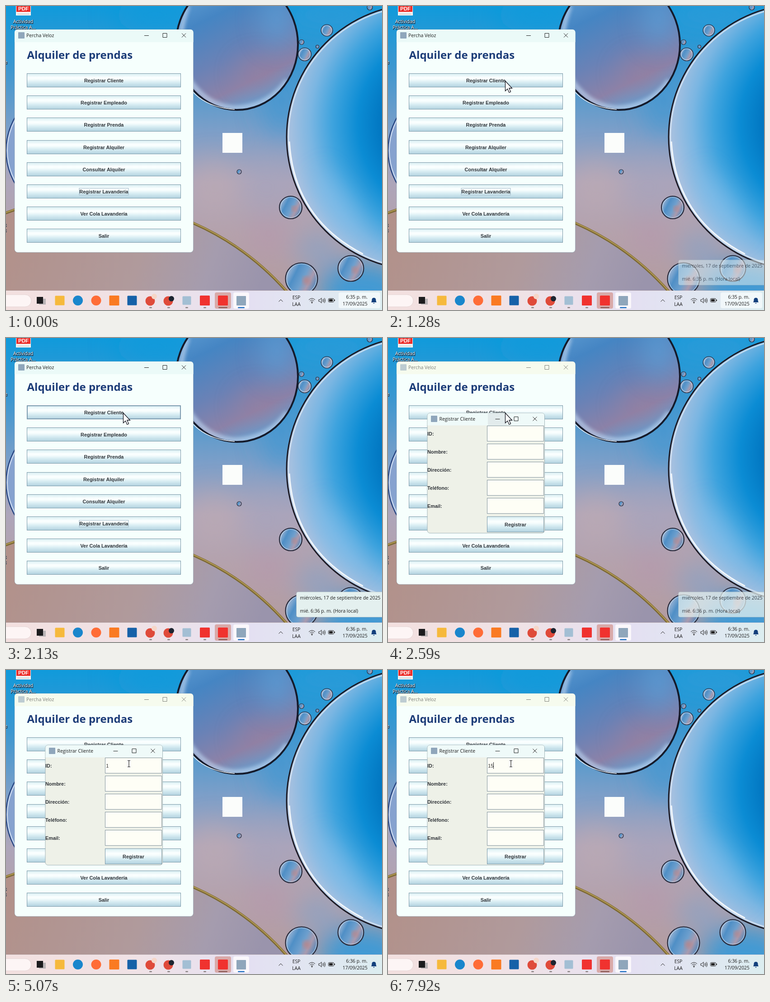
Recreate the animation shown at these times as an HTML page. Size 832 by 673 pixels, loop 8000 ms.

```html
<!DOCTYPE html>
<html lang="es">
<head>
<meta charset="utf-8">
<title>Alquiler de prendas</title>
<style>
html, body { margin: 0; width: 100%; height: 100%; overflow: hidden; }
svg { position: absolute; left: 0; top: 0; width: 832px; height: 673px; }
#wall { will-change: transform; }
text { white-space: pre; }
.ui { font: 10.4px "Open Sans", "Noto Sans", sans-serif; fill: #1a1a1a; }
.bold { font: bold 10.9px "Liberation Sans", Arial, sans-serif; fill: #2f3338; }
.field { font: 10.9px "Liberation Sans", Arial, sans-serif; fill: #333; }
.head { font: bold 24px "Open Sans", "Noto Sans", sans-serif; fill: #1c3c78; }
.mid { text-anchor: middle; }
.end { text-anchor: end; }
.line { fill: none; stroke: #222; stroke-width: 1; }
</style>
</head>
<body>
<svg id="wall" viewBox="0 0 832 673">
  <defs>
    <linearGradient id="sky" x1="0" y1="0" x2="0" y2="1">
      <stop offset="0" stop-color="#109adb"/><stop offset=".2" stop-color="#3c97d0"/>
      <stop offset=".42" stop-color="#7f9fc8"/><stop offset=".58" stop-color="#ada5ba"/>
      <stop offset=".75" stop-color="#b5a2ac"/><stop offset="1" stop-color="#b39a9c"/>
    </linearGradient>
    <linearGradient id="top" x1=".15" y1="0" x2=".6" y2="1">
      <stop offset="0" stop-color="#64a3d8"/><stop offset=".3" stop-color="#4585c3"/>
      <stop offset=".6" stop-color="#6a82b6"/><stop offset=".82" stop-color="#8c82a8"/>
      <stop offset="1" stop-color="#62a0d2"/>
    </linearGradient>
    <radialGradient id="big" cx=".62" cy=".45" r=".64">
      <stop offset="0" stop-color="#0068b2"/><stop offset=".38" stop-color="#0072bd"/>
      <stop offset=".55" stop-color="#0b8cd4"/><stop offset=".7" stop-color="#3ea3de"/>
      <stop offset=".83" stop-color="#7bb6e2"/><stop offset=".95" stop-color="#a5c0e0"/>
      <stop offset="1" stop-color="#b2c2de"/>
    </radialGradient>
    <linearGradient id="drop" x1="0" y1=".2" x2="1" y2=".7">
      <stop offset="0" stop-color="#b9c3da"/><stop offset=".3" stop-color="#4f8fc6"/>
      <stop offset=".55" stop-color="#6d9fcd"/><stop offset=".75" stop-color="#a99aae"/>
      <stop offset="1" stop-color="#4686bd"/>
    </linearGradient>
    <linearGradient id="floor" x1="0" y1="0" x2="1" y2=".15">
      <stop offset="0" stop-color="#b29088"/><stop offset=".55" stop-color="#b09a9c"/>
      <stop offset=".8" stop-color="#a59cae"/><stop offset="1" stop-color="#9a94ac"/>
    </linearGradient>
    <filter id="soft" x="-1" y="-1" width="3" height="3"><feGaussianBlur stdDeviation="28"/></filter>
    <filter id="glow"><feGaussianBlur stdDeviation="4"/></filter>
    <clipPath id="inBig"><circle cx="915" cy="290" r="293"/></clipPath>
    <clipPath id="inTop"><ellipse cx="511" cy="85" rx="135" ry="145"/></clipPath>
  </defs>
  <rect width="832" height="673" fill="url(#sky)"/>
  <g id="tints" filter="url(#soft)"></g>
  <circle cx="146" cy="320" r="146" fill="#86a2cf" stroke="#1f3c78" stroke-width="2"/>
  <circle cx="146" cy="320" r="143" fill="none" stroke="#cfdcf0" stroke-width="2"/>
  <path d="M-5 460Q210 376 415 481Q535 534 622 633V680H-5Z" fill="url(#floor)"/>
  <path d="M-5 460Q210 376 415 481Q535 534 622 633" fill="none" stroke="#7d6a35" stroke-width="6"/>
  <path d="M-5 459Q210 375 415 480Q535 533 622 632" fill="none" stroke="#b39a55" stroke-width="2"/>
  <g clip-path="url(#inTop)">
    <ellipse cx="511" cy="85" rx="136" ry="146" fill="url(#top)"/>
    <ellipse cx="560" cy="150" rx="45" ry="35" fill="#9a7f9e" opacity=".6" filter="url(#soft)"/>
    <ellipse cx="600" cy="30" rx="35" ry="60" fill="#58a8e0" opacity=".6" filter="url(#soft)"/>
    <path d="M402 0Q366 100 410 170Q450 224 508 226Q580 224 622 165" fill="none" stroke="#bcd3ee" stroke-width="10" opacity=".8" filter="url(#glow)"/>
  </g>
  <ellipse cx="511" cy="85" rx="135" ry="145" fill="none" stroke="#141a2a" stroke-width="4"/>
  <path d="M384 135Q408 222 506 229" fill="none" stroke="#e8f0f8" stroke-width="1.5"/>
  <g clip-path="url(#inBig)">
    <circle cx="915" cy="290" r="294" fill="url(#big)"/>
    <ellipse cx="735" cy="440" rx="25" ry="85" fill="#7cc0ee" opacity=".6" transform="rotate(-32 735 440)" filter="url(#soft)"/>
  </g>
  <circle cx="915" cy="290" r="294" fill="none" stroke="#1c1a24" stroke-width="3"/>
  <circle cx="915" cy="290" r="290" fill="none" stroke="#dbe6f2" stroke-width="3" opacity=".75"/>
  <path d="M627 300Q637 470 790 549" fill="none" stroke="#f2f7fb" stroke-width="3"/>
  <g id="drops"></g>
  <rect x="479" y="281" width="44" height="44" fill="#fbfdfb"/>
  <g id="desk"></g>
</svg>
<svg id="ui" viewBox="0 0 832 673">
  <defs>
    <linearGradient id="btn" x1="0" y1="0" x2="0" y2="1">
      <stop offset="0" stop-color="#d8eef2"/><stop offset=".3" stop-color="#fbffff"/>
      <stop offset=".42" stop-color="#f6fdfd"/><stop offset=".65" stop-color="#d8edf3"/>
      <stop offset="1" stop-color="#b2d2df"/>
    </linearGradient>
    <linearGradient id="bar">
      <stop offset="0" stop-color="#f3e0df"/><stop offset=".35" stop-color="#f0e2e6"/>
      <stop offset=".65" stop-color="#e4e0f2"/><stop offset="1" stop-color="#dcedf0"/>
    </linearGradient>
  </defs>
  <g id="main"></g>
  <g id="dialog"></g>
  <g id="tip"></g>
  <g id="task"></g>
  <path id="arrow" d="M.5 0V22L5.500 17.500L9 25.500L12.500 24L9 16H15.500Z" fill="#fff" stroke="#15151f" stroke-width="1.300"/>
  <g id="beam" fill="none">
    <path d="M269 200.500H275M269 214.500H275M272 200V215" stroke="#fff" stroke-width="3"/>
    <path d="M269 200.500H275M269 214.500H275M272 200V215" stroke="#222" stroke-width="1.200"/>
  </g>
</svg>
<script>
const $ = id => document.getElementById(id);
const rect = (x, y, w, h, fill, extra = '') =>
  `<rect x="${x}" y="${y}" width="${w}" height="${h}" fill="${fill}" ${extra}/>`;
const disc = (x, y, r, fill, extra = '') =>
  `<circle cx="${x}" cy="${y}" r="${r}" fill="${fill}" ${extra}/>`;
const text = (x, y, str, cls = 'ui', extra = '') =>
  `<text x="${x}" y="${y}" class="${cls}" ${extra}>${str}</text>`;
const line = (d, extra = '') => `<path class="line" d="${d}" ${extra}/>`;

// Wallpaper
$('tints').innerHTML = [
  [610, 210, 45, 80, '#3f97d2', .7], [330, 20, 90, 40, '#149adb', .8],
  [720, 20, 110, 40, '#2f9bd8', .8], [580, 400, 60, 60, '#a5a3bd', .5],
  [460, 400, 60, 60, '#c0aab2', .6], [580, 510, 45, 45, '#b496ae', .6],
  [690, 540, 50, 45, '#86a3c8', .7], [790, 630, 100, 65, '#3f9ad4', 1]
].map(([x, y, rx, ry, c, o]) =>
  `<ellipse cx="${x}" cy="${y}" rx="${rx}" ry="${ry}" fill="${c}" opacity="${o}"/>`).join('');

$('drops').innerHTML = [
  [710, 54, 13], [661, 107, 14.5], [654, 80, 5.5], [689, 90, 3.5], [805, 3, 6],
  [630, 446, 25], [654, 604, 35.5], [763, 581, 28.5], [516, 367, 5]
].map(([x, y, r]) =>
  disc(x, y, r, 'url(#drop)', `stroke="#2b2c3c" stroke-width="${r > 20 ? 2.2 : 1.2}"`) +
  (r > 10 ? disc(x, y, r - 2.5, 'none', 'stroke="#d9e3ee" stroke-width="1.2" opacity=".7"') : '') +
  (r > 20 ? disc(x + r * .3, y + r * .1, r * .25, '#b98589', 'opacity=".8" filter="url(#glow)"') : '')
).join('');

const label = (x, y, str, cls = 'ui mid') =>
  text(x + .6, y + .8, str, cls, 'style="fill:#10243a;stroke:#10243a;stroke-width:1.4;stroke-opacity:.7"') +
  text(x, y, str, cls, 'style="fill:#fff"');
$('desk').innerHTML =
  rect(22, -4, 33, 25, '#f4f4f4') + rect(23, -4, 31, 17, '#ec2f2b') + rect(25, 17, 27, 1.5, '#c9c9c9') +
  text(38.5, 10, 'PDF', 'bold mid', 'style="fill:#fff;font-size:11.5px"') +
  label(38, 38, 'Actividad') + label(38, 51, 'Práctica A...') +
  label(-3, 128, 'e', 'ui') + label(-4, 488, 's', 'ui') + label(-4, 500, 's', 'ui');

// Windows
const captionButtons = (min, max, close, y) => line(
  `M${min - 5} ${y + .5}h10M${max - 4.5} ${y - 4.5}h9v9h-9zM${close - 4.5} ${y - 4.5}l9 9m0 -9l-9 9`);
const javaIcon = (x, y, s) => rect(x, y, s, s, '#8fa6bb', 'rx="1"');
const button = (x, y, w, h, str) =>
  rect(x + .5, y + .5, w - 1, h - 1, 'url(#btn)', 'stroke="#7c98a8"') +
  text(x + w / 2, y + h / 2 + 4, str, 'bold mid');
const ring = (id, y, w) => rect(216.5 - w / 2, y, w, 15, 'none', `id="${id}" stroke="#9fb8c8"`);

const actions = ['Registrar Cliente', 'Registrar Empleado', 'Registrar Prenda', 'Registrar Alquiler',
  'Consultar Alquiler', 'Registrar Lavandería', 'Ver Cola Lavandería', 'Salir'];
$('main').innerHTML =
  rect(19, 52, 395.5, 493.5, '#f6fffd', 'rx="7" stroke="#7d98a8" stroke-opacity=".5"') +
  '<path id="title" d="M19 80V59Q19 52 26 52H407.500Q414.500 52 414.500 59V80Z"/>' +
  `<g id="caption">${javaIcon(27, 58, 14)}${text(45, 69, 'Percha Veloz')}${captionButtons(311, 351.5, 393.5, 65)}</g>` +
  text(46.5, 117, 'Alquiler de prendas', 'head') +
  actions.map((a, i) => button(46, Math.round(149 + 49.2 * i), 341, 31, a)).join('') +
  rect(47.5, 150.5, 338, 28, 'none', 'id="hover" stroke="#7f9fb8"') +
  ring('ringTop', 157.5, 90) + ring('ringLow', 403.5, 109);

const fields = ['ID:', 'Nombre:', 'Dirección:', 'Teléfono:', 'Email:'];
$('dialog').innerHTML =
  rect(87, 166, 259.5, 266, '#eef1e8', 'rx="6" stroke="#8fa3ab" stroke-opacity=".8"') +
  '<path d="M87.500 193.500V172Q87.500 166.500 93 166.500H340.500Q346 166.500 346 172V193.500Z" fill="#effaf9"/>' +
  rect(221, 166.5, 41.5, 27, '#e2ebec', 'id="minHover"') +
  javaIcon(95, 172, 14) + text(113.5, 183, 'Registrar Cliente') + captionButtons(242.5, 283.5, 325, 179) +
  fields.map((f, i) => {
    const y = 194 + 40 * i;
    return text(87, y + 22, f, 'bold') +
      rect(219.5, y + .5, 125, 34, '#fefef6', 'stroke="#8596a0"');
  }).join('') +
  button(219, 395, 126, 35, 'Registrar') +
  text(221.2, 216, '', 'field', 'id="typed"') + rect(0, 204, 1, 15, '#333', 'id="caret"');

// Clock tooltip and taskbar
$('tip').innerHTML =
  rect(642.5, 562, 200, 56, '#e4f0ef', 'rx="4" stroke="#9fb0b8" stroke-opacity=".6"') +
  text(650.5, 579, 'miércoles, 17 de septiembre de 2025') + text(650.5, 608, '', 'ui', 'id="tipTime"');

const square = (x, s, c) => rect(x - s / 2, 652 - s / 2, s, s, c, 'rx="1.5"');
const dash = (x, w, c) => rect(x - w / 2, 666.5, w, 2.5, c, 'rx="1.2"');
$('task').innerHTML =
  rect(0, 630, 832, 43, 'url(#bar)') + rect(0, 630, 832, 1, '#e6dcdf') +
  rect(-30, 639, 86, 27, '#fdf5f5', 'rx="13.5" stroke="#e4d3d3"') +
  rect(462, 634, 36, 36, '#d9aaa9', 'rx="4"') + rect(503, 634, 35, 36, '#faf7fb', 'rx="4"') +
  rect(73, 648, 15, 13, '#b9b4b6') + rect(68, 644, 14, 15, '#1c1c1e') +
  square(119, 21, '#f6b93c') + disc(159, 652, 11, '#1a86cc') + disc(199.5, 652, 11, '#ff6c37') +
  square(239.5, 22, '#fa7a22') + square(279, 21, '#1661a8') +
  disc(319, 653, 10.5, '#df4a3a') + disc(328, 643, 6, '#f6d6c8') +
  disc(359, 653, 10.5, '#df4a3a') + disc(366, 648, 6, '#1c2430') +
  square(400, 19, '#a3bfd4') + square(440, 22, '#f0322f') + square(480, 22, '#f0322f') + javaIcon(510, 642, 21) +
  [320, 360, 400, 440].map(x => dash(x, 6, '#8b8586')).join('') +
  dash(480, 20, '#8a5c5a') + dash(520.5, 15, '#2271c4') +
  line('M603.500 654.500l4.500 -4.500l4.500 4.500', 'stroke-width="1.3"') +
  text(642.5, 649, 'ESP', 'ui mid') + text(642.5, 664, 'LAA', 'ui mid') +
  line('M670 650.500q7 -6.500 14 0M672.500 653q4.500 -4 9 0M674.800 655.300q2.200 -2 4.400 0') + disc(677, 657, 1.2, '#222') +
  line('M692 650h2.500l3.500 -3.500v11l-3.500 -3.500h-2.500zM700.500 649.500q2 2.500 0 5M702.500 648q3 4 0 8M704.500 646.500q4 5.500 0 11') +
  rect(713.5, 647.5, 12, 8, 'none', 'rx="2" stroke="#222"') + rect(715, 649, 8, 5, '#222') + rect(726.5, 650, 1.5, 3, '#222') +
  rect(736, 634, 92, 35, '#f7fcfd', 'id="clockHover" rx="4" opacity=".8"') +
  text(800, 648, '', 'ui end', 'id="clock"') + text(800, 663, '17/09/2025', 'ui end') +
  '<path d="M808 656q1.500 -2 1.500 -5q0 -5 4.500 -5t4.500 5q0 3 1.500 5zM812 657.500h4q-2 3 -4 0z" fill="#123f7c"/>';

// Motion
const LOOP = 8000;
const path = [[250, 815, 598], [480, 640, 480], [700, 440, 335], [860, 310, 220], [1000, 262, 161],
  [1070, 243, 151], [1210, 256, 163], [1280, 259, 166], [2720, 259, 166], [2860, 262, 180],
  [3060, 267, 201], [3130, 270, 206.5], [LOOP, 270, 206.5]];
const caretFlips = [3130, 3600, 4130, 5070, 5530, 6070, 6590, 7390, 7920];

const ramp = (t, a, b) => Math.min(1, Math.max(0, (t - a) / (b - a)));
const show = (id, on) => { $(id).style.display = on ? '' : 'none'; };
const put = (id, str) => { if ($(id).textContent !== str) $(id).textContent = str; };

function place(t) {
  const i = Math.max(1, path.findIndex(p => p[0] > t));
  const [t0, x0, y0] = path[i - 1], [t1, x1, y1] = path[i];
  const k = ramp(t, t0, t1);
  return `translate(${x0 + (x1 - x0) * k} ${y0 + (y1 - y0) * k})`;
}

function draw(t) {
  const later = t >= 1870, away = t >= 2320;
  const time = later ? '6:36 p. m.' : '6:35 p. m.';
  put('clock', time);
  put('tipTime', `mié. ${time} (Hora local)`);
  show('clockHover', !later);
  $('tip').style.opacity = Math.min(ramp(t, 1000, 1540), 1 - ramp(t, 2500, 2860));

  show('hover', later && !away);
  show('ringTop', t >= 2140 && !away);
  show('ringLow', t < 2140);
  $('title').style.fill = away ? '#f6fbee' : '#ebfaf8';
  $('caption').style.opacity = away ? .55 : 1;

  const open = ramp(t, 2390, 2590), size = .9 + .1 * open;
  show('dialog', open > 0);
  $('dialog').style.opacity = open;
  $('dialog').setAttribute('transform', `translate(217 299) scale(${size}) translate(-217 -299)`);
  show('minHover', t < 4200);

  put('typed', t >= 6860 ? '15' : t >= 4530 ? '1' : '');
  $('caret').setAttribute('x', t >= 6860 ? 233 : t >= 4530 ? 227 : 220);
  show('caret', caretFlips.filter(f => f <= t).length % 2 === 1);

  show('arrow', t >= 250 && t < 4200);
  show('beam', t >= 4200);
  $('arrow').setAttribute('transform', place(t));
}

const start = performance.now();
function tick() {
  draw((performance.now() - start) % LOOP);
  requestAnimationFrame(tick);
}
draw(0);
requestAnimationFrame(tick);
</script>
</body>
</html>
```
